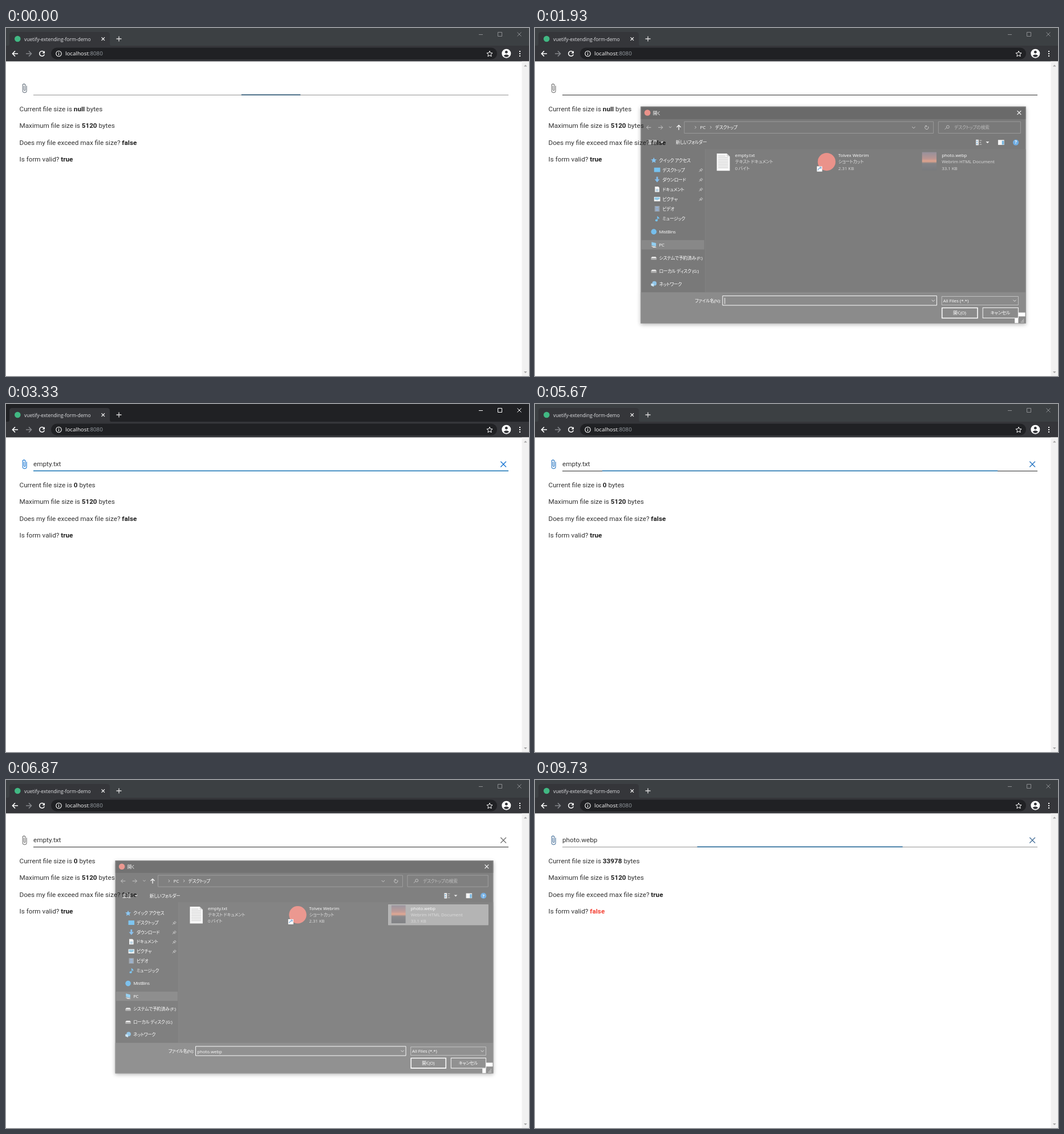
These frames come from a looping animation (917x610 px, 9790 ms). An HTML page:

```html
<!DOCTYPE html>
<html lang="ja">
<head>
<meta charset="utf-8">
<title>vuetify-extending-form-demo</title>
<style>
html, body { margin: 0; width: 100%; height: 100%; overflow: hidden; background: #fff; }
svg { display: block; width: 917px; height: 610px; }
text { white-space: pre; }
.ui { font: 8.1px "Open Sans", "Noto Sans CJK JP", "Noto Sans CJK", sans-serif; font-feature-settings: "palt"; fill: #fff; }
.jp { letter-spacing: -.3px; }
.page { font: 11.73px Roboto, sans-serif; fill: #333; }
.page .value { font-weight: 700; fill: #212121; }
.page .value.invalid { fill: #f44336; }
.line { fill: none; stroke: #fff; }
.dim { fill: #c4c4c4; }
#dialog { transform-origin: 523px 327.5px; filter: drop-shadow(0 2px 4px rgba(0,0,0,.5)); }
</style>
</head>
<body>
<svg viewBox="0 0 917 610">
  <defs>
    <linearGradient id="sunset" x2="0" y2="1">
      <stop offset="0" stop-color="#4b4254"/><stop offset=".35" stop-color="#8a4b45"/>
      <stop offset=".5" stop-color="#c9623d"/><stop offset=".62" stop-color="#2b2a30"/>
      <stop offset="1" stop-color="#1a1c22"/>
    </linearGradient>
    <clipPath id="sidebarClip"><path d="M176 209h114.5v258H176z"/></clipPath>
  </defs>

  <!-- Browser window -->
  <path id="titleBar" d="M0 0h917v31.5H0z"/>
  <path d="M0 31h917v27.6H0zM2 31.5q4 0 4-4V12q0-5 5-5h166q5 0 5 5v15.500q0 4 4 4z" fill="#35363a"/>
  <circle cx="20.300" cy="19" r="5.300" fill="#41b883"/>
  <text class="ui" x="32" y="22.600" style="font-size:8.53px;fill:#e0e1e4">vuetify-extending-form-demo</text>
  <path class="line" d="M167.500 16.300l5.500 5.500m0-5.500l-5.500 5.500" stroke-width="1.200"/>
  <path class="line" d="M193.500 19h9m-4.500-4.500v9" stroke="#ddd" stroke-width="1.300" style="stroke:#ddd"/>
  <path id="controls" class="line" d="M829 11.500h7M862.500 7.500h7v7h-7zM896.500 7.500l7 7m0-7l-7 7"/>

  <rect x="79" y="34.500" width="782" height="20.500" rx="10.250" fill="#202124"/>
  <g class="line" stroke-width="1.500">
    <path d="M21 45h-9.500m4.500-4.600L11.400 45l4.600 4.600"/>
    <path d="M35 45h9.500m-4.500-4.600l4.600 4.600-4.600 4.600" style="stroke:#85878b"/>
    <path d="M66.600 42.200a4.400 4.400 0 1 0 .7 4"/>
    <path d="M68 40v4.500h-4.500z" fill="#fff" stroke="none"/>
    <circle cx="92.500" cy="45" r="4.700" stroke-width="1.100"/>
    <path d="M92.500 44.300v3.400m0-5.600v1.200" stroke-width="1.200"/>
    <path d="M848 40.300l1.400 3.300 3.600.3-2.700 2.400.8 3.500-3.100-1.900-3.100 1.900.8-3.500-2.700-2.400 3.600-.3z" stroke-width="1"/>
  </g>
  <text class="ui" x="104" y="48.300" style="font-size:9.75px">localhost<tspan fill="#9aa0a6">:8080</tspan></text>
  <circle cx="877.300" cy="44.700" r="8" fill="#fff"/>
  <path d="M872.500 48.500q4.800-4 9.600 0q-4.800 5-9.600 0z" fill="#35363a"/>
  <circle cx="877.300" cy="42.200" r="2.400" fill="#35363a"/>
  <path d="M900 40h2v2h-2zm0 4h2v2h-2zm0 4h2v2h-2z" fill="#fff"/>

  <path d="M904.500 58.600h12.500V610h-12.500z" fill="#f1f1f1"/>
  <path d="M908 67.500l2.800-3 2.800 3zM908 602l2.800 3 2.800-3z" fill="#a3a3a3"/>

  <!-- Form -->
  <path id="baseLine" d="M48 117h833v1H48z"/>
  <path id="focusLine" d="M-416.500 116.500h833v1.500h-833z"/>
  <g id="icons" fill="none">
    <path transform="translate(23.500 96.800) scale(.7333)" stroke-width="1.500"
      d="M17.250 6V17.500a4.750 4.750 0 0 1-9.500 0V5a3.250 3.250 0 0 1 6.500 0V15.500a1.750 1.750 0 0 1-3.500 0V6"/>
    <path id="clear" d="M867.300 100.800l9.600 9.600m0-9.600l-9.600 9.600" stroke-width="1.400"/>
  </g>
  <g class="page">
    <text id="fileName" x="48" y="109.300"></text>
    <text x="23.500" y="146">Current file size is <tspan class="value" id="size"></tspan> bytes</text>
    <text x="23.500" y="175.300">Maximum file size is <tspan class="value">5120</tspan> bytes</text>
    <text x="23.500" y="204.700">Does my file exceed max file size? <tspan class="value" id="exceeds"></tspan></text>
    <text x="23.500" y="234">Is form valid? <tspan class="value" id="valid"></tspan></text>
  </g>

  <!-- File dialog -->
  <g id="dialog" class="ui">
    <path d="M176 132.500h694v390.500H176z" fill="#191919"/>
    <path d="M176 132.500h694V155H176z" fill="#000"/>
    <path d="M293 209h577v258H293z" fill="#202020"/>
    <path d="M292 209h1v258h-1z" fill="#303030"/>
    <path d="M176 467h694v56H176z" fill="#383838"/>
    <rect x="176.500" y="133" width="693" height="389.500" class="line" style="stroke:#555" stroke-opacity=".6"/>
    <circle cx="188" cy="143.500" r="5.500" fill="#db4437"/>
    <text class="jp" x="198" y="146.700">開く</text>
    <path class="line" d="M854.500 140l7 7m0-7l-7 7" stroke-width="1.200"/>

    <g class="line">
      <path d="M194.500 170h-8m3.500-3.500l-3.500 3.500 3.500 3.500M207.500 170h8m-3.500-3.500l3.500 3.500-3.500 3.500" style="stroke:#a0a0a0"/>
      <path d="M227 168.500l2.200 2 2.200-2" style="stroke:#a0a0a0"/>
      <path d="M244.500 174.500v-8.500m-3.700 3.700l3.700-3.700 3.700 3.700" stroke-width="1.300"/>
      <path d="M254.500 159.500h449v21h-449zM712.500 159.500h148v21h-148z" style="stroke:#555"/>
      <path d="M273.500 167.500l2.200 2.300-2.200 2.300m27.500-4.600l2.200 2.300-2.200 2.300M665 168.800l2.800 2.800 2.800-2.800M694 168.300a3.200 3.200 0 1 1-3.300-1.300m-2 0h2.500v2.500" style="stroke:#aaa"/>
      <path d="M724 173.500l3-3m5-1.500a2.500 2.500 0 1 1-5 0a2.500 2.500 0 0 1 5 0" style="stroke:#999"/>
    </g>
    <text x="283" y="173">PC</text>
    <text class="jp" x="310" y="173">デスクトップ</text>
    <text class="jp" x="741" y="173" style="fill:#8a8a8a">デスクトップの検索</text>
    <text class="jp" x="189" y="199.800">整理</text>
    <text class="jp" x="239" y="199.800">新しいフォルダー</text>
    <path d="M211 195.500h6l-3 3.200zM798 195.500h6l-3 3.200z" fill="#ddd"/>
    <path d="M780 192h5v10h-5z" fill="#ddd"/>
    <path d="M781 194h2v2h-2zm0 4h2v2h-2z" fill="#1976b8"/>
    <path class="line" d="M786.500 193.500h4m-4 3.500h3m-3 3.500h4" style="stroke:#aaa"/>
    <path d="M820 192.500h11v9h-11z" fill="#eee"/>
    <path d="M827 194h3.500v7H827z" fill="#1583c9"/>
    <circle cx="852" cy="197" r="5.300" fill="#0b74d1"/>
    <text x="852" y="200" text-anchor="middle" font-weight="700">?</text>

    <path d="M177 373h113.500v17H177z" fill="#333"/>
    <g id="sidebar" class="jp" clip-path="url(#sidebarClip)"></g>

    <rect id="highlight" y="213.500" width="183" height="37"/>
    <path d="M313 217h18l5.500 5.500v25.500H313z" fill="#f4f4f4"/>
    <path d="M331 217v5.500h5.500z" fill="#bbb"/>
    <path class="line" d="M315.500 221.500h13m-13 3h18m-18 3h18m-18 3h18m-18 3h18m-18 3h18m-18 3h18m-18 3h18" style="stroke:#8a8a8a" stroke-width=".8"/>
    <circle cx="511" cy="232" r="16" fill="#db4437"/>
    <path d="M493.500 240h9.500v9.500h-9.500z" fill="#fff"/>
    <path class="line" d="M495.500 247.500q0-4 5-4.500m-2.500-1.500h3v3" style="stroke:#1668b5" stroke-width="1.200"/>
    <path d="M683 214.500h26v33h-26z" fill="url(#sunset)"/>
    <g id="files"></g>

    <text class="jp" x="320" y="485.500" text-anchor="end">ファイル名(N):</text>
    <path d="M323.500 473.500h386v17h-386z" class="line"/>
    <path d="M718.500 474.500h138v15.500h-138z" class="line" style="stroke:#999"/>
    <path class="line" d="M700.500 480.800l2.700 2.700 2.700-2.700m141.300 0l2.700 2.700 2.700-2.700" style="stroke:#ccc"/>
    <text id="entry" x="326.500" y="485.800"></text>
    <path id="caret" d="M327 477h1v11h-1z"/>
    <text x="721" y="485">All Files (*.*)</text>
    <path d="M719 495h64v18.500h-64z" class="line" stroke-width="1.600"/>
    <path d="M792.500 495h64v18.500h-64z" class="line" stroke-width="1.200" style="stroke:#ddd"/>
    <text class="jp" x="750.500" y="507.300" text-anchor="middle">開く(O)</text>
    <text class="jp" x="824" y="507.300" text-anchor="middle">キャンセル</text>
    <path d="M857 503.500h12v7h-12zM850 514h6.500v8.500H850z"/>
    <path d="M865 515h1.500v1.500H865zm-2 2.500h1.500v1.500H863zm2 0h1.500v1.500H865zm-4 2.500h1.500v1.500H861zm2 0h1.500v1.500H863zm2 0h1.500v1.500H865z" fill="#aaa"/>
  </g>
</svg>
<script>
const $ = id => document.getElementById(id);
const clamp = x => Math.max(0, Math.min(1, x));
const mix = (from, to, k) => `rgb(${from.map((c, i) => Math.round(c + (to[i] - c) * k))})`;

// Sidebar icons are drawn around their own centre.
const shape = (d, color) => `<path d="${d}" fill="${color}"/>`;
const drive = shape('M-5 0l2-2h6l2 2v3.500h-10z', '#777') + shape('M-5 0l2-2h6l2 2z', '#eee');
const rows = [
  ['クイック アクセス', 209, 229, shape('M0-5l1.500 3.500 3.700.3-2.800 2.400.9 3.600L0 3l-3.300 1.800.9-3.600-2.800-2.400 3.700-.3z', '#2f9bea')],
  ['デスクトップ', 215, 246.5, shape('M-5.500-4h11v8h-11z', '#1597e5'), true],
  ['ダウンロード', 215, 264, shape('M-1.500-5h3v4.500h3L0 5l-4.500-5.500h3z', '#2d8fe0'), true],
  ['ドキュメント', 215, 281.5, shape('M-4-5h6l2 2v8h-8z', '#eee') + shape('M-2.500 0h5v1h-5zm0 2h5v1h-5z', '#2f80b5'), true],
  ['ピクチャ', 215, 299, shape('M-5.500-4h11v8h-11z', '#eee') + shape('M-4.500-3h9v3l-4 2-5-1z', '#43a3d5'), true],
  ['ビデオ', 215, 316.5, shape('M-4.500-5h9V5h-9z', '#53616e') + shape('M-2.500-4h5v3.500h-5zm0 4.500h5V4h-5z', '#4b78b0')],
  ['ミュージック', 215, 334.5, shape('M0-5l3.500 3v3L1-1v4a2.200 1.800 0 1 1-1-1.500z', '#1597e5')],
  ['MistBins', 209, 358, '<circle r="5" fill="#1490df"/>'],
  ['PC', 209, 381.5, shape('M-4-5L4-3v6l-8-2z', '#47aee8') + shape('M-5 2l7 1 3 2h-6z', '#ccc')],
  ['システムで予約済み (F:)', 209, 405, drive],
  ['ローカル ディスク (G:)', 209, 428.5, drive],
  ['ネットワーク', 209, 452, '<circle cx="1" cy="-1" r="4" fill="#3f9bd8"/>' + shape('M-5-1l5 1v5l-5-2z', '#a8d5ef')],
];
$('sidebar').innerHTML = rows.map(([label, x, y, icon, pinned]) =>
  `<g transform="translate(${x - 9.5} ${y})">${icon}</g><text x="${x}" y="${y + 3}">${label}</text>` +
  (pinned ? `<path class="line" d="M281 ${y + 3.5}l2.500-2.500m-1.500-1.500l3.500 3.500m-2-3.500l2-2 2 2-2 2z" style="stroke:#aaa"/>` : '')
).join('');

const files = [
  [346, 'empty.txt', 'テキスト ドキュメント', '0 バイト'],
  [532, 'Tolvex Webrim', 'ショートカット', '2.31 KB'],
  [718.5, 'photo.webp', 'Webrim HTML Document', '33.1 KB'],
];
$('files').innerHTML = files.map(([x, ...lines]) => lines.map((line, i) =>
  `<text x="${x}" y="${223 + i * 11.7}" class="${i ? 'dim' : ''} ${/[ァ-ー]/.test(line) ? 'jp' : ''}">${line}</text>`
).join('')).join('');

// CSS-style cubic-bezier(.25, .8, .5, 1)
function ease(p) {
  let lo = 0, hi = 1, u = .5;
  for (let i = 0; i < 20; i++) {
    u = (lo + hi) / 2;
    const x = .75 * u * (1 - u) ** 2 + 1.5 * u * u * (1 - u) + u ** 3;
    if (x < p) lo = u; else hi = u;
  }
  return 2.4 * u * (1 - u) ** 2 + 3 * u * u * (1 - u) + u ** 3;
}

const LOOP = 9790, STEP = 1000 / 15;
const focusChanges = [[-150, false], [1418, true], [1610, false], [3000, true], [5650, false], [6880, true], [9664, false]];
const visits = [
  { open: 1863, hover: 2260, caretOff: 2460, select: 2660, close: 2790, x: 304.5, name: 'empty.txt' },
  { open: 5930, hover: 6460, caretOff: 6525, select: 6660, close: 6790, x: 677.5, name: 'photo.webp' },
];
const states = [
  { from: 0, name: '', size: 'null', tooBig: false },
  { from: 3000, name: 'empty.txt', size: '0', tooBig: false },
  { from: 6880, name: 'photo.webp', size: '33978', tooBig: true },
];
const GREY = [117, 117, 117], BLUE = [25, 118, 210], BLACK = [20, 20, 20], LINE_BLUE = [22, 114, 180];

function drawWindow(t) {
  const [since, focused] = focusChanges.findLast(([time]) => time <= t);
  const p = clamp((t - since) / 300), e = ease(p);
  const amount = focused ? e : 1 - e;
  $('titleBar').setAttribute('fill', focused ? '#202124' : '#3c4043');
  $('controls').style.stroke = focused ? '#fff' : '#8b8d90';
  $('baseLine').setAttribute('fill', t > 460 && t < 9660 ? '#2b2b2b' : '#949494');
  $('focusLine').setAttribute('transform', `translate(464.5) scale(${amount} 1)`);
  $('focusLine').setAttribute('fill', mix(BLACK, LINE_BLUE, focused ? clamp(p * 1.4 - .23) : 1 - p));
  $('icons').setAttribute('stroke', mix(GREY, BLUE, amount));
}

function drawForm(t) {
  const state = states.findLast(s => s.from <= t);
  $('fileName').textContent = state.name;
  $('clear').style.display = state.name ? '' : 'none';
  $('size').textContent = state.size;
  $('exceeds').textContent = state.tooBig;
  $('valid').textContent = !state.tooBig;
  $('valid').classList.toggle('invalid', state.tooBig);
}

function drawDialog(t) {
  const visit = visits.find(v => t >= v.open && t < v.close + 170);
  $('dialog').style.display = visit ? '' : 'none';
  if (!visit) return;
  const rest = 1 - clamp((t - visit.open) / 200);
  const closing = clamp((t - visit.close) / 170);
  const selected = t >= visit.select;
  $('dialog').style.opacity = (1 - rest ** 2) * (1 - closing);
  $('dialog').style.transform = `scale(${1 - .1 * rest ** 3 - .1 * closing})`;
  $('highlight').style.display = t >= visit.hover ? '' : 'none';
  $('highlight').setAttribute('x', visit.x);
  $('highlight').setAttribute('fill', selected ? '#777' : '#4d4d4d');
  $('highlight').setAttribute('stroke', selected ? '#858585' : '#4d4d4d');
  $('entry').textContent = selected ? visit.name : '';
  $('caret').style.display = t < visit.caretOff ? '' : 'none';
}

const start = performance.now();
function draw() {
  const elapsed = (performance.now() - start) % LOOP;
  const t = Math.floor((elapsed + 4) / STEP) * STEP;
  drawWindow(t);
  drawForm(t);
  drawDialog(t);
  requestAnimationFrame(draw);
}
draw();
</script>
</body>
</html>
```
